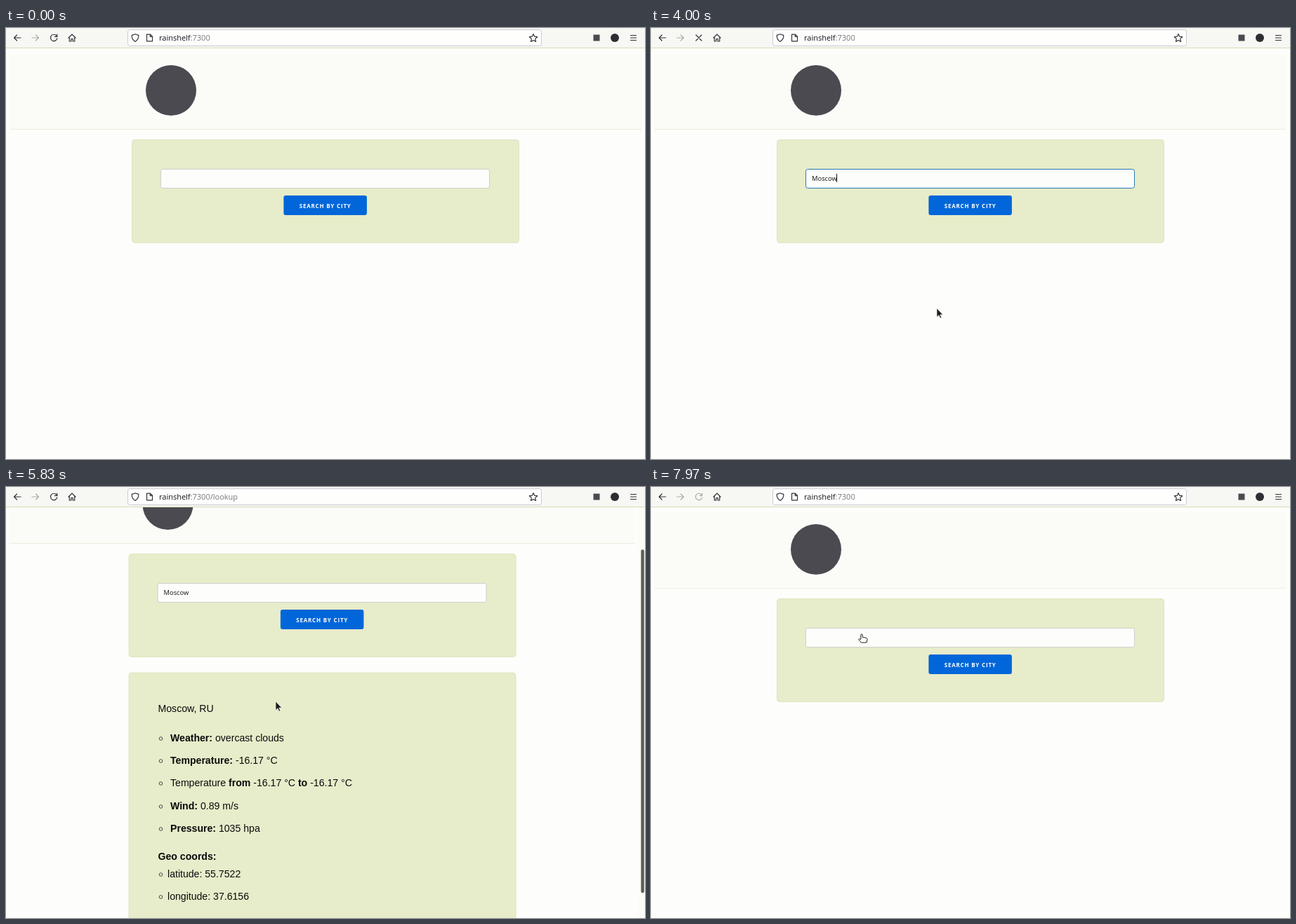
These frames come from a looping animation (910 by 615 pixels, 8 s). An HTML page:

```html
<!DOCTYPE html>
<html lang="en">
<head>
<meta charset="utf-8">
<title>City weather search</title>
<style>
  html, body { margin: 0; width: 100%; height: 100%; overflow: hidden; background: #fdfdfb; }
  svg { display: block; }
  .ui { font: 11px "Open Sans", "Noto Sans", sans-serif; fill: #15141a; }
  .value { font-size: 9.4px; fill: #111; }
  .label { font-size: 8px; font-weight: 700; letter-spacing: .8px; fill: #fff; }
  .dim { fill: #77777c; }
  .body { font: 14.1px "Liberation Sans", Arial, sans-serif; fill: #0b0b0b; }
  .b { font-weight: 700; }
  .panel { fill: #e7ecca; stroke: #e0e5c3; }
  .icon { fill: none; stroke: #33333a; stroke-width: 1.2; stroke-linecap: round; stroke-linejoin: round; }
  .off { opacity: .38; }
  .bullet { fill: none; stroke: #222; stroke-width: .8; }
</style>
</head>
<body>
<svg width="910" height="615" viewBox="0 0 910 615">
  <rect width="910" height="615" fill="#fdfdfb"/>

  <g id="page">
    <rect id="header" x="5" y="37" height="107" fill="#fbfbf8"/>
    <path id="rule" fill="none" stroke="#eeefdf"/>
    <g id="column">
      <circle cx="235" cy="89" r="36" fill="#4a4a50"/>
      <rect class="panel" x="179.500" y="159.500" width="551" height="147" rx="4"/>
      <rect id="field" x="220.500" y="201.500" width="468" height="27" rx="3" fill="#fdfdfc"/>
      <text id="value" class="ui value" x="229" y="217.500"></text>
      <path id="caret" stroke="#111"/>
      <rect x="395.400" y="239" width="118.500" height="28" rx="3" fill="#0066d9"/>
      <text class="ui label" x="417.700" y="256.500">SEARCH BY CITY</text>
      <g id="results">
        <rect class="panel" x="179.500" y="329" width="551" height="365" rx="4"/>
      </g>
    </g>
  </g>

  <g id="scrollbar">
    <rect x="901" y="29" width="9" height="586" fill="#fbfbf7"/>
    <rect id="thumb" x="904.300" width="4.500" height="490" rx="2.200" fill="#5c5c58"/>
  </g>

  <g id="status">
    <path d="M0 599.500H230q2.500 0 2.500 2.500V615H0z" fill="#f8f8f3" stroke="#d0d0c8"/>
    <text class="ui" x="1" y="611.500">rainshelf</text>
  </g>

  <g id="toolbar">
    <rect width="910" height="28" fill="#f7f7f4"/>
    <path d="M0 28.500H910" stroke="#d9dcb4"/>
    <rect x="173.500" y="2.500" width="589" height="23" rx="3" fill="#fefefd" stroke="#cbcbd2"/>
    <g class="icon">
      <path d="M21 14H11.500M15.500 10l-4 4 4 4"/>
      <path class="off" d="M37 14h9.500M42.500 10l4 4-4 4"/>
      <path id="reload" d="M72 11.200A4.700 4.700 0 1 0 72.800 14.800M72.800 9v3.400h-3.400"/>
      <path id="stop" d="M64 10l8 8M72 10l-8 8"/>
      <path d="M89 14l5-5 5 5M90.300 13.500V19h2.500v-3.500h2.400V19h2.500V13.500"/>
      <path d="M184 8.700l4.800 1.700q.4 6-4.800 9-5.200-3-4.800-9z"/>
      <path d="M200.500 9.200h5l3 3v6.600h-8zM205.300 9.400v3h3"/>
      <path d="M751 8.500l1.700 3.700 4 .5-3 2.700.8 4-3.500-2-3.500 2 .8-4-3-2.700 4-.5z"/>
      <path d="M889.500 10.500h8M889.500 14h8M889.500 17.500h8"/>
    </g>
    <rect x="836.500" y="9.500" width="9" height="9" fill="#4a4a50"/>
    <circle cx="867" cy="14" r="6" fill="#2e2e32"/>
    <text class="ui" x="218" y="18">rainshelf<tspan id="address" class="dim"></tspan></text>
  </g>

  <g id="cursor">
    <path id="arrow" d="M0 0V12.500l2.900-2.700 1.900 4.300 1.900-.8-1.900-4.200h3.800z" fill="#1d1d20" stroke="#fff" stroke-width=".6"/>
    <path id="beam" d="M-2-5.500q2 0 2 1.200V4.300q0 1.200-2 1.200M2-5.500q-2 0-2 1.200V4.300q0 1.200 2 1.200" fill="none" stroke="#222"/>
    <path id="hand" d="M-1.200 1.200q1.200-1.800 2.400 0V4.800l5 .9q1.800.5 1.800 2.300l-1 4.500H-.5L-4.500 8q.4-1.800 3.300 0z" fill="#fff" stroke="#222" stroke-linejoin="round"/>
  </g>
</svg>

<script>
const LOOP = 8000, CITY = "Moscow", SCROLL_MAX = 101;
const FOCUS = 570, SUBMIT = 4000, LOADED = 4300, READY = 4820;
const CLICK = 7430, HOME = 7560, HOME_READY = 7720, COOLDOWN = 650;
const KEYS = [2200, 2330, 2500, 2770, 2970, 3170];

// Pointer stops: time, x, y
const STOPS = [
  [30, 540, -16], [560, 465, 213], [870, 465, 213], [1140, 407, 400],
  [4850, 407, 400], [5130, 450, 350], [5440, 384, 306],
  [6780, 384, 306], [7080, 263, 97.5], [7570, 263, 97.5], [7960, 300, 209.5]
];

// Result lines: baseline, text x, text; asterisks mark bold
const LINES = [
  [385, 221, "Moscow, RU"],
  [427, 238.5, "*Weather:* overcast clouds"],
  [459, 238.5, "*Temperature:* -16.17 °C"],
  [491, 238.5, "Temperature *from* -16.17 °C *to* -16.17 °C"],
  [524, 238.5, "*Wind:* 0.89 m/s"],
  [556, 238.5, "*Pressure:* 1035 hpa"],
  [596, 221, "*Geo coords:*"],
  [621, 234.5, "latitude: 55.7522"],
  [653, 234.5, "longitude: 37.6156"]
];

const el = {};
document.querySelectorAll("[id]").forEach(e => el[e.id] = e);

el.results.innerHTML += LINES.map(([y, x, text]) => {
  const rich = text.replace(/\*(.+?)\*/g, '<tspan class="b">$1</tspan>');
  const bullet = x > 221 ? `<circle class="bullet" cx="225" cy="${y - 4}" r="2.3"/>` : "";
  return `${bullet}<text class="body" x="${x}" y="${y}">${rich}</text>`;
}).join("");

const set = (e, attrs) => { for (const k in attrs) e.setAttribute(k, attrs[k]); };
const show = (e, on) => { e.style.display = on ? "" : "none"; };
const clamp = v => Math.min(1, Math.max(0, v));
const smooth = u => u * u * (3 - 2 * u);
const easeOut = u => 1 - (1 - u) ** 2;
const within = (t, a, b) => t >= a && t < b;

function pointer(t) {
  let [, x, y] = STOPS[0];
  for (let i = 1; i < STOPS.length; i++) {
    const [t0, x0, y0] = STOPS[i - 1], [t1, x1, y1] = STOPS[i];
    if (t < t0) break;
    const u = smooth(clamp((t - t0) / (t1 - t0)));
    x = x0 + (x1 - x0) * u;
    y = y0 + (y1 - y0) * u;
  }
  return [x, y];
}

function drawPage(t) {
  const found = within(t, LOADED, HOME);
  const scroll = Math.round(SCROLL_MAX *
    (easeOut(clamp((t - 5770) / 155)) - easeOut(clamp((t - 6620) / 180))));
  const right = found ? 896 : 905;
  set(el.page, { transform: `translate(0 ${-scroll})` });
  set(el.column, { transform: `translate(${found ? -4.5 : 0} 0)` });
  set(el.header, { width: right - 5 });
  set(el.rule, { d: `M5 144.500H${right}` });
  set(el.thumb, { y: 31 + scroll * 0.91 });
  show(el.results, found);
  show(el.scrollbar, found);
  el.address.textContent = found ? ":7300/lookup" : ":7300";
}

function drawField(t) {
  const focused = within(t, FOCUS, LOADED);
  const typed = t < HOME ? KEYS.filter(k => t >= k).length : 0;
  el.value.textContent = CITY.slice(0, typed);
  set(el.field, { stroke: focused ? "#2679b5" : "#cdd0cb" });
  const x = 228.7 + (typed ? el.value.getComputedTextLength() : 0);
  set(el.caret, { d: `M${x} 208V220` });
  show(el.caret, focused && !within(t, 1170, 1770));
}

function drawToolbar(t) {
  const loading = within(t, SUBMIT, READY) || within(t, CLICK, HOME_READY);
  const resting = within(t, READY, READY + COOLDOWN) || t >= HOME_READY;
  show(el.stop, loading);
  show(el.reload, !loading);
  el.reload.classList.toggle("off", resting);
  show(el.status, within(t, SUBMIT + 80, READY - 60));
}

function drawCursor(t) {
  const [x, y] = pointer(t);
  const hand = t >= 7030;
  const beam = !hand && x > 221 && x < 688 && y > 201 && y < 228;
  set(el.cursor, { transform: `translate(${x} ${y})` });
  show(el.hand, hand);
  show(el.beam, beam);
  show(el.arrow, !hand && !beam);
}

function frame() {
  const t = performance.now() % LOOP;
  drawPage(t);
  drawField(t);
  drawToolbar(t);
  drawCursor(t);
  requestAnimationFrame(frame);
}
frame();
</script>
</body>
</html>
```
